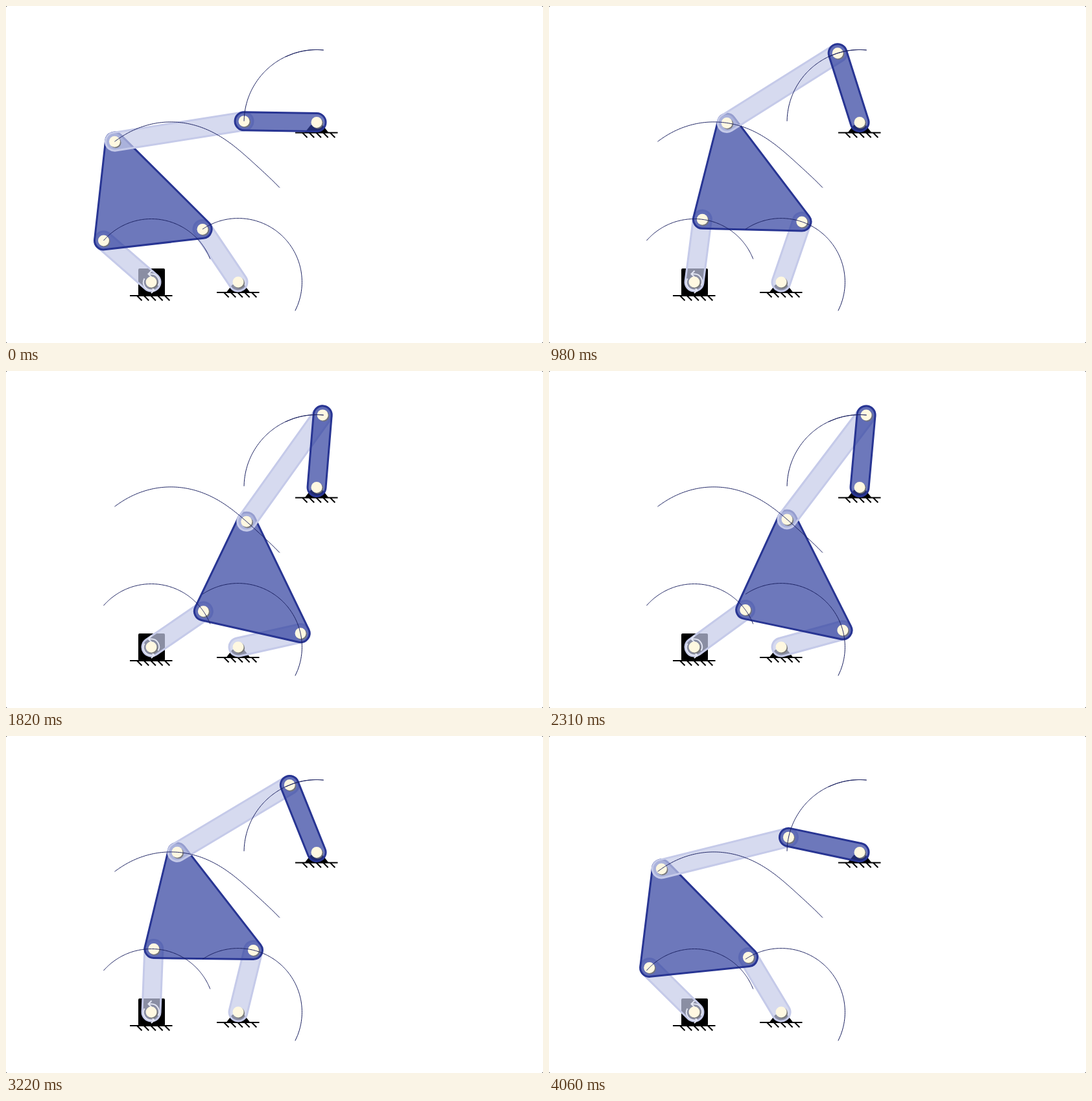
An HTML page for the animation above (4130 ms loop, 828 px wide and 520 px high).

```html
<!DOCTYPE html>
<html lang="en">
<head>
<meta charset="utf-8">
<title>Linkage</title>
<style>
  html, body { margin: 0; width: 100%; height: 100%; overflow: hidden; background: #000; }
  svg { display: block; width: 828px; height: 520px; background: #fff; border-radius: 2px; }
  .pale, .dark { fill-opacity: .7; stroke-width: 3; }
  .pale { fill: #c5cae9; stroke: #c5cae9; }
  .dark { fill: #303f9f; stroke: #283593; }
  .ground { fill: none; stroke: #000; stroke-width: 2; }
  .turn { fill: none; stroke: #e3e6f4; stroke-width: 2; }
  .trace { fill: none; stroke: #1a2060; stroke-width: 1; }
  .shade { fill: #757575; fill-opacity: .9; }
  .pin { fill: #fff8e1; }
</style>
</head>
<body>
<svg id="stage" viewBox="0 0 828 520"></svg>
<script>
const STEP = 70, STEPS = 59;
const MIN_ANGLE = -48.9, MAX_ANGLE = 68.6;
const BAR_RADIUS = 14;

// Fixed pivots
const A = [224, 426], B = [358, 426], D = [479, 179.5];

// Link lengths
const CRANK = 97.5, ROCKER = 98.4, BASE = 153.5, SIDE = 153.6, SLOPE = 191.4;
const COUPLER = 202, ARM = 112;

const stage = document.getElementById('stage');

function add(tag, cls, attrs = {}) {
  const el = document.createElementNS('http://www.w3.org/2000/svg', tag);
  if (cls) el.setAttribute('class', cls);
  for (const name in attrs) el.setAttribute(name, attrs[name]);
  stage.appendChild(el);
  return el;
}

// Crossing of two circles, on the left of the way from a to b
function meet(a, ra, b, rb) {
  const dx = b[0] - a[0], dy = b[1] - a[1], d = Math.hypot(dx, dy);
  const along = (d * d + ra * ra - rb * rb) / (2 * d);
  const off = Math.sqrt(Math.max(0, ra * ra - along * along));
  const ux = dx / d, uy = dy / d;
  return [a[0] + ux * along + uy * off, a[1] + uy * along - ux * off];
}

function solve(degrees) {
  const t = degrees * Math.PI / 180;
  const P = [A[0] + CRANK * Math.sin(t), A[1] - CRANK * Math.cos(t)];
  const Q = meet(P, BASE, B, ROCKER);
  const R = meet(P, SIDE, Q, SLOPE);
  const S = meet(R, COUPLER, D, ARM);
  return { P, Q, R, S };
}

// Outline with round corners about clockwise points
function hull(points) {
  const r = BAR_RADIUS;
  let d = '';
  points.forEach((p, i) => {
    const q = points[(i + 1) % points.length];
    const dx = q[0] - p[0], dy = q[1] - p[1], len = Math.hypot(dx, dy);
    const nx = dy / len * r, ny = -dx / len * r;
    const from = `${p[0] + nx} ${p[1] + ny}`;
    d += i ? `A${r} ${r} 0 0 1 ${from}` : `M${from}`;
    d += `L${q[0] + nx} ${q[1] + ny}`;
    if (i === points.length - 1) {
      const s = points[1], ex = s[0] - q[0], ey = s[1] - q[1], l = Math.hypot(ex, ey);
      d += `A${r} ${r} 0 0 1 ${q[0] + ey / l * r} ${q[1] - ex / l * r}Z`;
    }
  });
  return d;
}

function ground(x, y) {
  let d = `M${x - 33} ${y}h65.5`;
  for (let i = 0; i < 5; i++) d += `M${x - 22 + i * 10.7} ${y}l7.5 7.5`;
  add('path', 'ground', { d });
}

function pedestal([x, y]) {
  add('path', '', { d: `M${x - 18.5} ${y + 16}l9.5 -12h18l9.5 12z` });
  ground(x, y + 16);
}

function pin() {
  const shade = add('circle', 'shade', { r: 8.5 });
  const face = add('circle', 'pin', { r: 8.5 });
  return ([x, y]) => {
    shade.setAttribute('cx', x + 1.6);
    shade.setAttribute('cy', y + 1.6);
    face.setAttribute('cx', x);
    face.setAttribute('cy', y);
  };
}

pedestal(B);
pedestal(D);
add('rect', '', { x: 204, y: 405, width: 41, height: 42, rx: 2 });
ground(A[0], 447);

const crank = add('path', 'pale');
const rocker = add('path', 'pale');
const plate = add('path', 'dark');
const coupler = add('path', 'pale');
const arm = add('path', 'dark');

add('path', 'turn', {
  d: 'M220 413.5h4a12 12 0 0 1 10.5 18M224.5 408.5l-5 5l5 5' +
     'M228 438.5h-4a12 12 0 0 1 -10.5 -18M224 433.5l4.5 5l-4.5 4.5'
});

[A, B, D].forEach(p => pin()(p));
const pins = { P: pin(), Q: pin(), R: pin(), S: pin() };

const paths = { P: [], Q: [], R: [], S: [] };
for (let i = 0; i <= 160; i++) {
  const pose = solve(MIN_ANGLE + (MAX_ANGLE - MIN_ANGLE) * i / 160);
  for (const key in paths) paths[key].push(pose[key].map(v => v.toFixed(2)).join());
}
for (const key in paths) add('polyline', 'trace', { points: paths[key].join(' ') });

// Steady swing out, then back
function angleAt(step) {
  return step < 29.5 ? MIN_ANGLE + 4.015 * step : 53.8 - 3.964 * (step - 33);
}

function draw(step) {
  const pose = solve(angleAt(step)), { P, Q, R, S } = pose;
  crank.setAttribute('d', hull([A, P]));
  rocker.setAttribute('d', hull([B, Q]));
  plate.setAttribute('d', hull([P, R, Q]));
  coupler.setAttribute('d', hull([R, S]));
  arm.setAttribute('d', hull([S, D]));
  for (const key in pins) pins[key](pose[key]);
}

const start = performance.now();
let shown = 0;
function tick() {
  const step = Math.floor((performance.now() - start) / STEP) % STEPS;
  if (step !== shown) draw(shown = step);
  requestAnimationFrame(tick);
}
draw(0);
requestAnimationFrame(tick);
</script>
</body>
</html>
```
